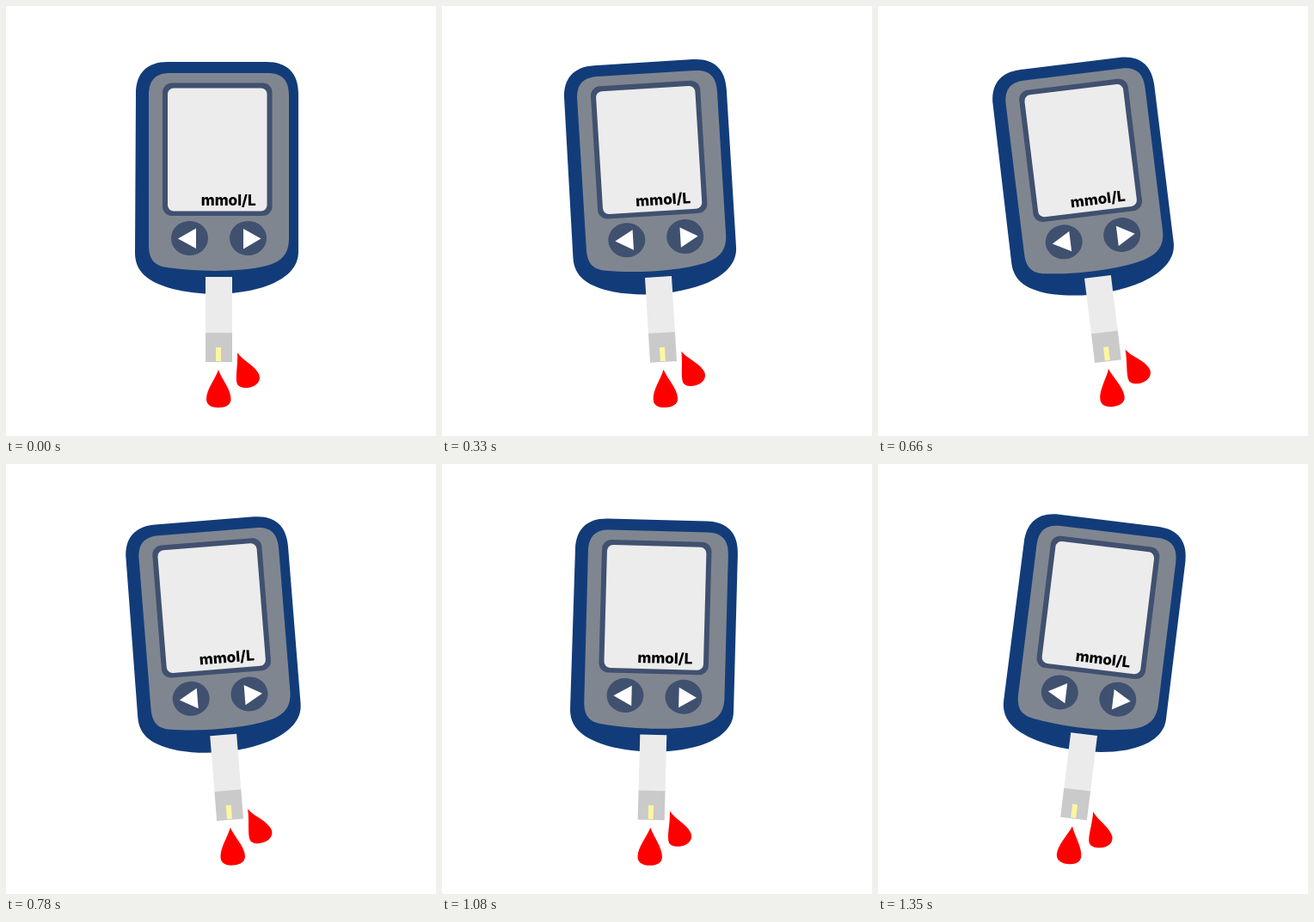
Animation, 500 px wide and 500 px high, one loop 1560 ms. Source, as an HTML page:

```html
<!DOCTYPE html>
<html lang="en">
<head>
<meta charset="utf-8">
<title>Glucose meter</title>
<style>
  html, body { margin: 0; width: 100%; height: 100%; overflow: hidden; background: #fff; }
  svg { display: block; width: 100%; height: 100%; }
  text { font: 800 17.2px Inter, "Open Sans", sans-serif; text-anchor: middle; }
</style>
</head>
<body>
<svg viewBox="0 0 500 500">
  <g id="meter">
    <path fill="#123c79" d="M151 102C151 78 164 65 188 65H303C327 65 340 78 340 102V286C340 304 326 318 299 327C266 337 226 337 194 329C165 321 150 309 150 287Z"/>
    <path fill="#808690" d="M166 104C166 86 174 78 191 78H304C321 78 329 86 329 104V270C329 288 321 297 303 302C270 310 222 309 187 304C172 302 166 294 166 278Z"/>
    <rect x="182" y="89.500" width="127.500" height="154.500" rx="11" fill="#40506f"/>
    <rect x="188" y="95.500" width="115.500" height="143" rx="7" fill="#ececec"/>
    <text x="258.700" y="231.500">mmol/L</text>
    <g fill="#40506f">
      <ellipse cx="213.500" cy="270" rx="21.500" ry="20"/>
      <ellipse cx="281.500" cy="270" rx="21.500" ry="20"/>
    </g>
    <path fill="#fff" d="M200 270.500L221 258.500V282ZM296.500 270.500L276 259V282.500Z"/>
    <rect x="232" y="315" width="31" height="66" fill="#ebebeb"/>
    <rect x="232" y="380" width="31" height="34" fill="#cacaca"/>
    <rect x="244" y="397" width="6" height="16" fill="#fff6a0"/>
    <g fill="#f00">
      <path d="M247 423C243 434 233 446 233 457C233 464 239 467 247 467C255 467 261.500 464 261.500 457C261.500 446 251 434 247 423Z"/>
      <path d="M269 403C275 412 288 417 293.500 427C297 433 294 439 288 442C282 445 272 445 269 440C266 433 270 417 269 403Z"/>
    </g>
  </g>
</svg>
<script>
  const LOOP = 1560, STEP = 30, TILT = 7;
  const TURN = 660, END = 1350;
  const meter = document.getElementById("meter");

  // Tilt left from upright, swing over to the right, then hold.
  function angle(t) {
    if (t <= TURN) return -TILT * t / TURN;
    const k = Math.min(1, (t - TURN) / (END - TURN));
    return TILT * (2 * k - 1);
  }

  function draw(now) {
    const t = Math.floor((now % LOOP) / STEP) * STEP;
    meter.setAttribute("transform", `rotate(${angle(t)} 250 250)`);
  }

  function tick() {
    draw(performance.now() - start);
    requestAnimationFrame(tick);
  }

  const start = performance.now();
  tick();
</script>
</body>
</html>
```
